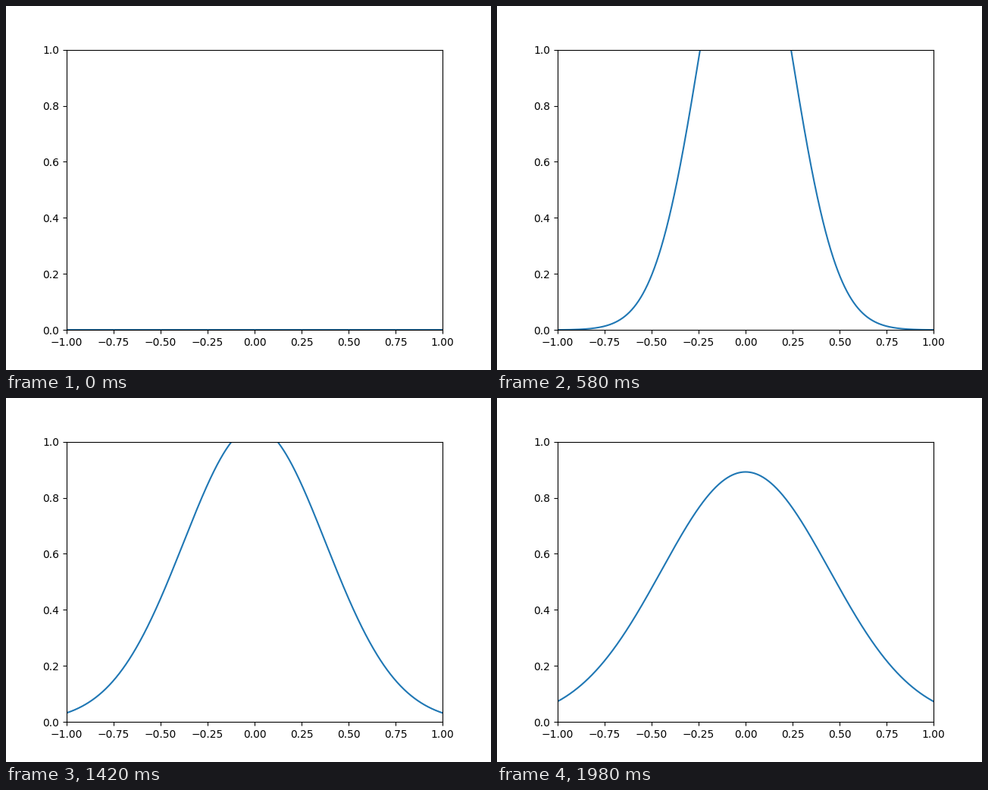
A matplotlib script for the animation above (2 s loop, 640 px wide and 480 px high).

```python
import numpy as np
import matplotlib.pyplot as plt
from matplotlib.animation import FuncAnimation

FRAMES = 100
INTERVAL = 20          # ms
FINAL_VARIANCE = 0.2
TINY = 1e-12           # keeps the starting pulse finite

x = np.linspace(-1, 1, 1000)
variances = np.linspace(TINY, FINAL_VARIANCE, FRAMES)


def gaussian(x, variance):
    return np.exp(-x**2 / (2 * variance)) / np.sqrt(2 * np.pi * variance)


fig, ax = plt.subplots(figsize=(6.4, 4.8), dpi=100)
ax.set_xlim(-1, 1)
ax.set_ylim(0, 1)
line, = ax.plot(x, gaussian(x, variances[0]), color="#1f77b4", lw=1.5)


def update(i):
    """Spread the pulse by diffusion: variance grows linearly in time."""
    line.set_ydata(gaussian(x, variances[i]))
    return line,


anim = FuncAnimation(fig, update, frames=FRAMES, interval=INTERVAL,
                     repeat=True, repeat_delay=0, blit=False)
plt.show()
```
